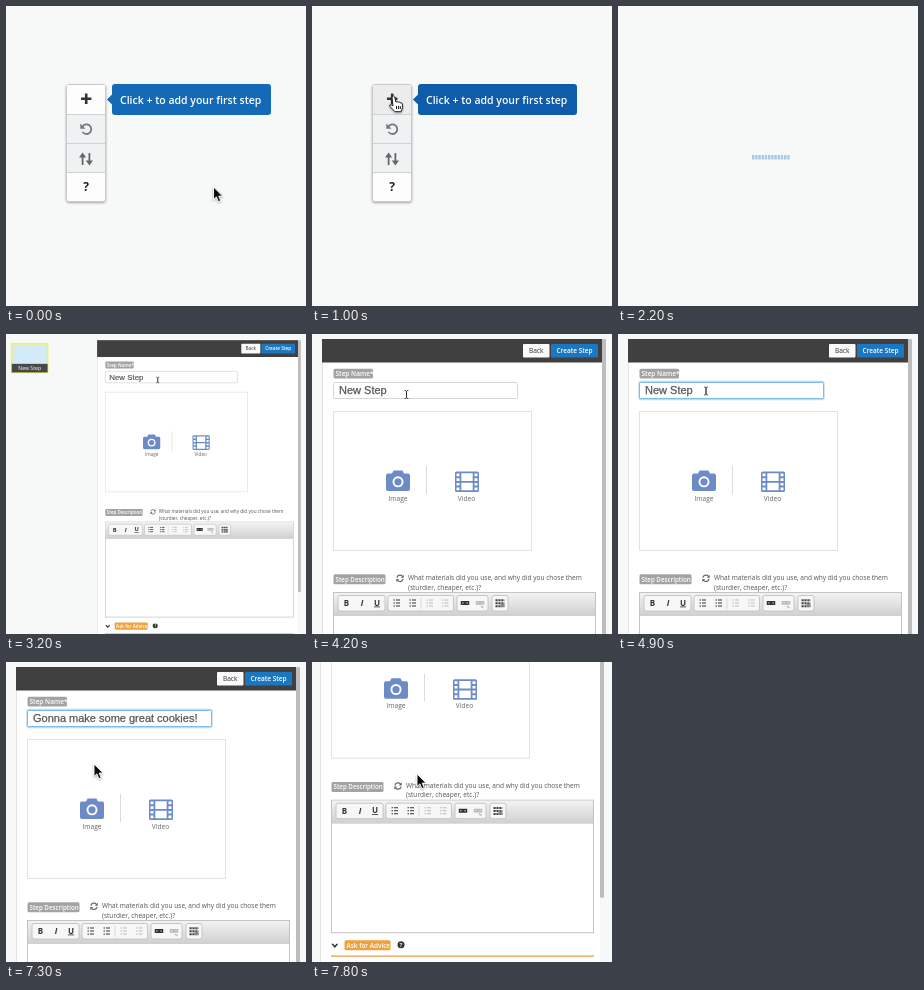
Animation of 300 by 300 pixels, one loop 8000 ms. Source, as an HTML page:

```html
<!DOCTYPE html>
<html lang="en">
<head>
<meta charset="utf-8">
<title>Add a step</title>
<style>
  html, body { margin: 0; width: 100%; height: 100%; overflow: hidden; background: #f7f9f9; }
  svg { display: block; width: 100%; height: 100%; }
  text { font-family: "Open Sans", sans-serif; white-space: pre; }
  .ui { font-family: "Liberation Sans", sans-serif; }
  .mid { text-anchor: middle; }
  .line { fill: none; stroke-linecap: round; }
</style>
</head>
<body>
<svg viewBox="0 0 300 300">
  <defs>
    <linearGradient id="bar" x2="0" y2="1">
      <stop stop-color="#f3f3f3"/><stop offset="1" stop-color="#cfcfcf"/>
    </linearGradient>
    <filter id="soft" x="-50%" y="-50%" width="200%" height="200%">
      <feDropShadow dx="0" dy="1" stdDeviation="1" flood-opacity=".35"/>
    </filter>
    <g id="refresh">
      <path class="line" d="M-3-1A3.2 3.2 0 0 1 2.5-2M3 1A3.2 3.2 0 0 1-2.5 2" stroke="#666" stroke-width="1.2"/>
      <path d="M3.7-3.6v3H.8ZM-3.7 3.6v-3H-.8Z" fill="#666"/>
    </g>
  </defs>
  <rect width="300" height="300" fill="#f7f9f9"/>

  <g id="intro">
    <rect x="60.5" y="78.5" width="39" height="117" rx="2.5" fill="#fdfdfd" stroke="#c9cbcb" filter="url(#soft)"/>
    <rect x="61" y="108" width="38" height="59" fill="#f0f1f2"/>
    <rect id="plus" x="61" y="79" width="38" height="29"/>
    <path d="M61 108.5h38M61 137.5h38M61 166.5h38" stroke="#cfd1d2"/>
    <path d="M75 92.8h10.4M80.2 87.6v10.4" stroke="#333" stroke-width="2.6"/>
    <path class="line" d="M76.5 120.5A4.8 4.8 0 1 1 77 126.5" stroke="#777" stroke-width="1.8"/>
    <path d="M74.3 117.5v5.2h5.2Z" fill="#777"/>
    <path d="M76.6 159v-9M83.4 147v9" stroke="#666" stroke-width="1.8"/>
    <path d="M73 151.5l3.6-5 3.6 5ZM79.8 154.5l3.6 5 3.6-5Z" fill="#666"/>
    <text class="mid" x="80" y="185.3" font-size="12" font-weight="700" fill="#222">?</text>
    <g id="tip">
      <path d="M101 93.5l6-6v12Z"/>
      <rect x="106" y="78" width="159" height="31" rx="3"/>
      <text x="114" y="98" font-size="10.5" font-weight="600" fill="#fff">Click + to add your first step</text>
    </g>
    <circle id="ripple" cx="80" cy="93" r="27.5" fill="#8a9aa8" fill-opacity=".18" stroke="#8a9aa8" stroke-opacity=".5" stroke-width="2"/>
  </g>

  <g id="loader">
    <path d="M134 151.2h38" stroke="#a8c8ea" stroke-width="4.6" stroke-dasharray="2.4 .8"/>
  </g>

  <g id="form">
    <g id="thumb">
      <rect x="-109" y="10" width="50" height="40" fill="#d3ebf9" stroke="#f2ee6a" stroke-width="2.4"/>
      <rect x="-109" y="38" width="50" height="12" fill="#484848"/>
      <text class="mid" x="-84" y="47" font-size="7.2" fill="#fff">New Step</text>
    </g>
    <rect x="10" y="5" width="280" height="500" fill="#fff"/>
    <path d="M10.5 5v500" stroke="#e3e5e5"/>
    <rect x="10" y="5" width="280" height="23.5" fill="#404040"/>
    <rect x="290" y="5" width="4" height="351" rx="1" fill="#bdbdbd"/>
    <rect x="211" y="10" width="26.5" height="13.5" rx="1" fill="#fafafa"/>
    <rect x="239" y="10" width="47" height="13.5" rx="1" fill="#1b77c1"/>
    <text class="mid" x="224.2" y="19.3" font-size="6.6" fill="#333">Back</text>
    <text class="mid" x="262.5" y="19.3" font-size="6.5" font-weight="600" fill="#fff">Create Step</text>

    <rect x="21.5" y="34.8" width="39.5" height="9.8" rx="1.5" fill="#a3a3a3"/>
    <text x="23.5" y="42" font-size="6.5" font-weight="600" fill="#fff">Step Name*</text>
    <rect id="glow" x="21.5" y="48" width="184" height="17" rx="1.5" fill="none" stroke="#b9dcf5" stroke-width="2.4"/>
    <rect id="field" x="21.5" y="48.5" width="184" height="16" rx="1" fill="#fff"/>
    <rect id="selection" x="26" y="51" width="50" height="13" fill="#b4d5fe"/>
    <text id="name" class="ui" x="27" y="60.3" font-size="11" fill="#555" stroke="#555" stroke-width=".25"></text>
    <path id="caret" d="M0 51v11.5" stroke="#444" stroke-width=".9"/>

    <rect x="21.5" y="77.5" width="198" height="139" fill="#fff" stroke="#e2e2e2"/>
    <path d="M114.5 132v28" stroke="#dcdcdc"/>
    <g fill="#6d8cc7">
      <path d="M76 139.5h4l1.5-3h9l1.5 3h4a2 2 0 0 1 2 2v13.500a2 2 0 0 1-2 2H76a2 2 0 0 1-2-2v-13.500a2 2 0 0 1 2-2Z"/>
      <circle cx="86" cy="147.800" r="5.500" fill="#fff"/><circle cx="86" cy="147.800" r="3.600"/>
      <rect x="143" y="137.500" width="24" height="20.500" rx="1.500"/>
      <path d="M149.300 139.300h11.400v7.600h-11.400ZM149.300 148.700h11.400v7.600h-11.400Z" fill="#fff"/>
      <path d="M146 139.500v17M164 139.500v17" stroke="#fff" stroke-width="3" stroke-dasharray="2.700 2"/>
    </g>
    <g class="mid" font-size="6.6" fill="#666">
      <text x="86" y="166.500">Image</text><text x="154.500" y="166.500">Video</text>
    </g>

    <rect x="21.5" y="240.200" width="52" height="10" rx="1.500" fill="#a3a3a3"/>
    <text x="23.5" y="247.600" font-size="6.200" font-weight="600" fill="#fff">Step Description</text>
    <use href="#refresh" x="88" y="244.300"/>
    <g font-size="6.550" fill="#555">
      <text x="96" y="246.300">What materials did you use, and why did you chose them</text>
      <text x="96" y="255.700">(sturdier, cheaper, etc.)?</text>
    </g>

    <rect x="21.500" y="258.500" width="262" height="132.500" fill="#fff" stroke="#c4c4c4"/>
    <rect x="22" y="259" width="261" height="23" fill="url(#bar)"/>
    <g id="groups" fill="#f7f7f7" stroke="#bbb" stroke-width=".8"></g>
    <g class="ui mid" font-size="8" fill="#333" font-weight="700">
      <text x="34.500" y="272">B</text>
      <text x="50" y="272" font-style="italic" font-family="Liberation Serif, serif">I</text>
      <text x="65" y="271.500" text-decoration="underline">U</text>
    </g>
    <g id="lists" fill="none" stroke-width="1.100"></g>
    <path d="M109 264v11" stroke="#ccc" stroke-width=".7"/>
    <g fill="none" stroke-width="1.500">
      <path d="M149.500 267.700h3v2.600h-3ZM153.500 267.700h3v2.600h-3ZM151.500 269h3" stroke="#333"/>
      <path d="M164.500 267.700h3v2.300h-3ZM168.500 267.700h3v2.300h-3ZM169 272l2.500 2" stroke="#bbb"/>
    </g>
    <path d="M183.500 266.200h9M183.500 269.200h9M183.500 272.200h9" stroke="#444" stroke-width="2" stroke-dasharray="2.200 .7"/>
    <path d="M188.500 269.500h4v3.500h-4Z" fill="#888"/>

    <path class="line" d="M22.500 402.600l2.300 2.500 2.300-2.500" stroke="#333" stroke-width="1.500"/>
    <rect x="34.500" y="398.500" width="46" height="10" rx="1.500" fill="#eda23e"/>
    <text x="36.500" y="405.900" font-size="6.400" font-weight="600" fill="#fff">Ask for Advice</text>
    <circle cx="91" cy="403" r="3.500" fill="#333"/>
    <text class="mid" x="91" y="405.300" font-size="6" font-weight="700" fill="#fff">?</text>
    <path d="M21 414.500h263" stroke="#dfa04e" stroke-width="1.300"/>
    <path id="ibeam" class="line" d="M-1.500-4q1.500 0 1.500 1V3q0 1-1.500 1M1.500-4q-1.500 0-1.500 1V3q0 1 1.500 1" stroke="#333" stroke-width=".9"/>
  </g>

  <path id="arrow" d="M0 0v12.500l2.900-2.600 2 4.800 2.300-1-2-4.600h4Z" fill="#111" stroke="#fff" stroke-width=".9" filter="url(#soft)"/>
  <path id="hand" d="M3 1q1.500-2 2.800 0l1 5q1.500-1 2.300.3 1.500-.8 2.200.5 1.700-.5 2 1.200l.4 3.200-1.500 4.500H6L1 10.500Q0 8.500 2 8.700l2 1.300ZM7.500 10v3M9.500 10v3M11.300 10v3" fill="#fff" stroke="#222" stroke-width="1" filter="url(#soft)"/>
</svg>
<script>
const LOOP = 8000;
const el = id => document.getElementById(id);
const set = (id, attrs) => Object.entries(attrs).forEach(([k, v]) => el(id).setAttribute(k, v));
const show = (id, on) => set(id, { display: on ? "inline" : "none" });
const place = (id, at) => {
  show(id, at);
  if (at) set(id, { transform: `translate(${at})` });
};
// Latest value whose start time has passed.
const held = (track, t) => track.reduce((value, [start, next]) => t >= start ? next : value, null);

const tracks = {
  scene: [[0, "intro"], [2200, "loader"], [3200, "form"]],
  camera: [
    [0, "translate(83.93 2.57) scale(.7174)"],
    [4200, "translate(0 0)"],
    [7800, "translate(-2 -120.3)"]
  ],
  arrow: [[0, [207.5, 181]], [500, [115.5, 117.5]], [1000, null], [7300, [88, 102]], [7800, [105, 112]]],
  hand: [[1000, [77, 90]], [2200, null]],
  ibeam: [[3200, [94.5, 60.5]], [4700, [88, 57]], [5900, null]],
  name: [
    [0, "New Step"], [5900, "Gonna "], [6200, "Gonna make "], [6500, "Gonna make some "],
    [6800, "Gonna make some great cookies"], [7300, "Gonna make some great cookies!"]
  ]
};

el("groups").innerHTML = [[26, 47], [76, 65.5], [145, 31], [180, 16]]
  .map(([x, w]) => `<rect x="${x}" y="261.500" width="${w}" height="15.500" rx="2"/>`).join("");
el("lists").innerHTML = [[81.5, "#333"], [97.5, "#333"], [114.5, "#bbb"], [130, "#bbb"]]
  .map(([x, c]) => `<path d="M${x} 266h1.500m1 0h4m-6.500 3h1.500m1 0h4m-6.500 3h1.500m1 0h4" stroke="${c}"/>`).join("");

function draw(t) {
  const now = {};
  for (const key in tracks) now[key] = held(tracks[key], t);
  for (const id of ["intro", "loader", "form"]) show(id, id === now.scene);
  for (const id of ["arrow", "hand", "ibeam"]) place(id, now[id]);

  const hover = t >= 1000 && t < 1700;
  set("tip", { fill: hover ? "#0f5cab" : "#146ab7" });
  set("plus", { fill: t >= 1000 ? "#ececed" : "#fdfdfd" });
  show("ripple", t >= 1500 && t < 1700);

  const focused = t >= 4900;
  const typing = t >= 5900;
  set("form", { transform: now.camera });
  set("field", { stroke: focused ? "#7fbce8" : "#d6d6d6" });
  show("glow", focused);
  show("selection", t >= 5400 && !typing);
  el("name").textContent = now.name;
  show("caret", typing && t < 7300);
  if (typing && now.scene === "form") {
    set("caret", { transform: `translate(${27.5 + el("name").getComputedTextLength()})` });
  }
}

const start = performance.now();
function tick() {
  draw((performance.now() - start) % LOOP);
  requestAnimationFrame(tick);
}
tick();
</script>
</body>
</html>
```
